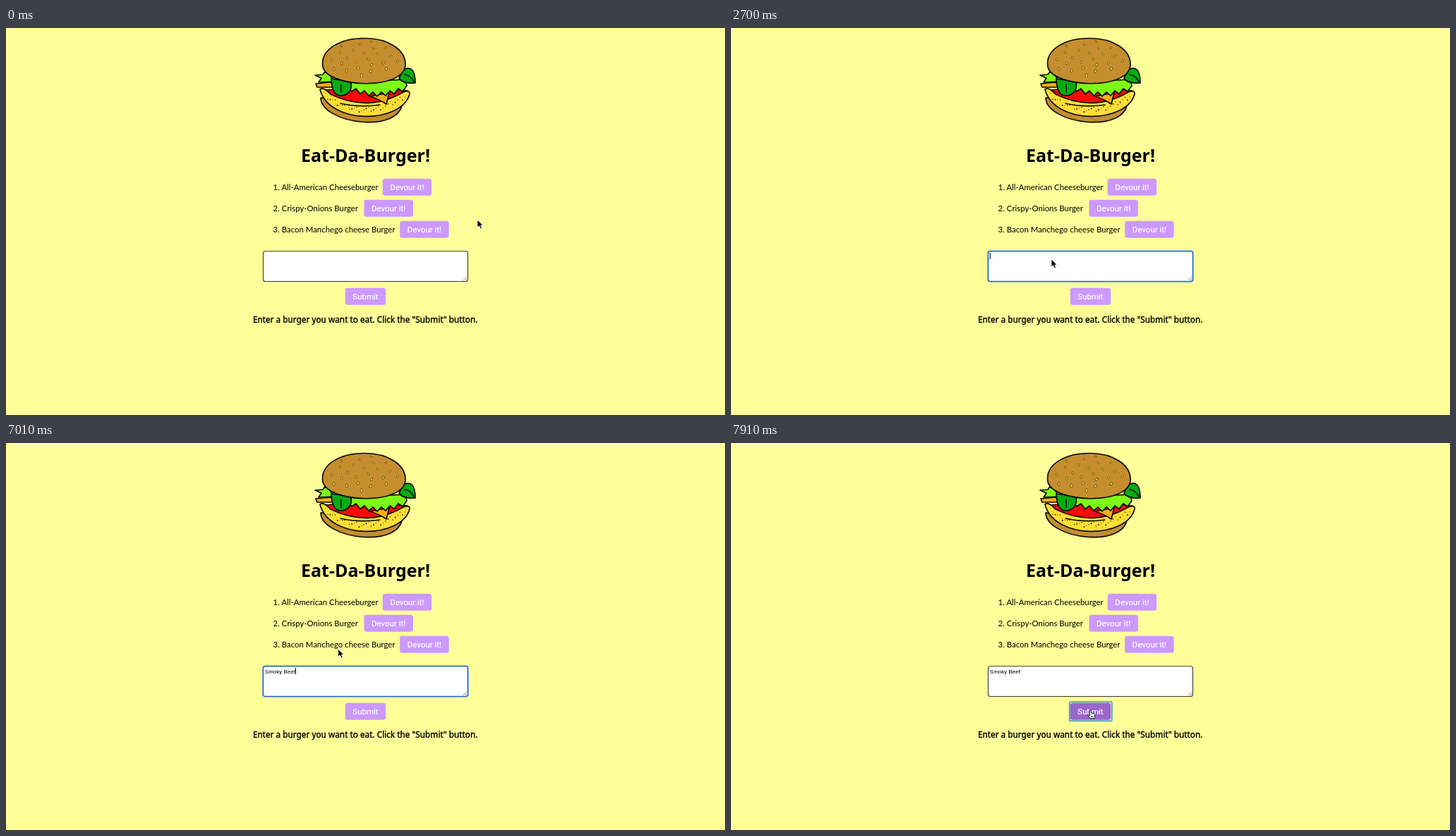
An HTML page that plays this animation: 1019 px wide and 549 px high, repeating every 8 s.

```html
<!DOCTYPE html>
<html lang="en">
<head>
<meta charset="utf-8">
<title>Eat-Da-Burger!</title>
<style>
  html, body { margin: 0; width: 100%; height: 100%; overflow: hidden; background: #fffe99; }
  svg { display: block; width: 100%; height: 100%; }
  text { white-space: pre; }
  .title { font: 700 25px "Noto Sans", "Open Sans", sans-serif; text-anchor: middle; }
  .hint { font: 11.8px "Noto Sans", "Open Sans", sans-serif; text-anchor: middle; stroke: #000; stroke-width: .35; }
  .item { font: 11.4px Lato, sans-serif; }
  .label { font: 11.5px Roboto, "Liberation Sans", sans-serif; fill: #fff; stroke: #fff; stroke-width: .2; text-anchor: middle; }
  .entry { font: 8px "Liberation Sans", Arial, sans-serif; }
  .burger path { stroke: #0b0b05; stroke-width: 1.7; stroke-linejoin: round; stroke-linecap: round; }
  .bun { fill: #c48e2e; }
  .cheese { fill: #ffad16; }
  .leaf { fill: #06ac10; }
  .lettuce { fill: #7dfa14; }
</style>
</head>
<body>
<svg viewBox="0 0 1019 549" preserveAspectRatio="none">
  <rect width="1019" height="549" fill="#fffe99"/>
  <g class="burger">
    <path class="bun" d="M446 99C447 136 562 152 562 103Z"/>
    <path fill="#f80a05" d="M452 88Q510 82 569 89C555 112 468 114 452 88Z"/>
    <path fill="#ffdf35" d="M445 87Q450 83 460 94Q514 120 563 91Q573 87 572 94C560 136 458 138 445 87Z"/>
    <path fill="none" d="M474 107Q500 113 530 109"/>
    <g id="specks" fill="#251b06"/>
    <path class="cheese" d="M439 79L460 77L466 84L441 84Z"/>
    <path class="cheese" d="M516 97L543 92L539 108Q529 101 516 97Z"/>
    <path class="lettuce" d="M438 67L449 66L452 62L458 65L465 76L443 77L447 71Z"/>
    <path class="lettuce" id="lettuce"/>
    <path class="leaf" d="M461 72Q462 96 474 96C487 96 492 84 488 76Z"/>
    <path class="leaf" d="M563 59Q580 51 580 78Q561 79 557 71Z"/>
    <path fill="none" stroke-width=".9" d="M475 80V91M565 66Q573 67 578 76"/>
    <path class="bun" d="M449 55C445 30 474 14.5 508 14.5S567 31 566 53C563 89 456 85 449 55Z"/>
    <g id="seeds" fill="#ffd947" stroke="#47320b" stroke-width=".7"/>
  </g>
  <text class="title" x="509.5" y="190">Eat-Da-Burger!</text>
  <g id="menu"></g>
  <rect id="glow" x="363.8" y="316" width="291.4" height="44" rx="3.5" fill="none" stroke="#a9cbdc" stroke-width="2"/>
  <rect id="box" x="364.5" y="316.7" width="290" height="42.8" rx="3" fill="#fff"/>
  <path d="M648 358L653 353M651 358L653 356" stroke="#777" stroke-width=".8"/>
  <text id="entry" class="entry" x="366.8" y="326.5"></text>
  <rect id="caret" y="319" width="1" height="9"/>
  <rect id="ring" x="479.8" y="367.2" width="60" height="27" rx="1" fill="#fff4bd" stroke="#5ca5c9" stroke-width="2"/>
  <g id="submit"></g>
  <text class="hint" x="509.2" y="417.7">Enter a burger you want to eat. Click the "Submit" button.</text>
  <path id="arrow" d="M0 0V11.2L2.6 8.8L4.6 13L6.6 12.1L4.7 8.1H8.2Z" stroke="#fff" stroke-width=".9"/>
  <path id="hand" d="M3 1Q5-.5 5.2 1.5L5.8 4.3Q11 4 10.9 7Q11 9.5 9.9 11.8H4.6Q3.4 9.7 1 7.6Q.6 6 3.8 7.7ZM6.2 8V10M8 8V10" fill="#fff" stroke="#000" stroke-width=".9" stroke-linejoin="round"/>
</svg>
<script>
const LOOP = 8000;
const FOCUS = 1650, HOVER = 7460, PRESS = 7910;
const BLINK = 455;
const ENTRY = "Smoky Beef";
const KEY_TIMES = [3440, 3890, 4180, 4330, 4770, 4920, 5510, 5960, 6260, 6560];

const $ = id => document.getElementById(id);
const clamp = v => Math.min(1, Math.max(0, v));
const show = (id, on) => $(id).setAttribute("visibility", on ? "visible" : "hidden");

function add(parent, tag, attrs, text = "") {
  const node = document.createElementNS("http://www.w3.org/2000/svg", tag);
  for (const key in attrs) node.setAttribute(key, attrs[key]);
  node.textContent = text;
  return parent.appendChild(node);
}

function addButton(parent, x, y, width, label) {
  const face = add(parent, "rect", { x, y, width, height: 24, rx: 3.5, fill: "#cc99ff" });
  add(parent, "text", { class: "label", x: x + width / 2, y: y + 16.3 }, label);
  return face;
}

function addMenuItem(number, name, buttonX) {
  const y = 183.7 + number * 30;
  add($("menu"), "text", { class: "item", x: 378.6, y: y + 16.5 }, `${number}. ${name}`);
  addButton($("menu"), buttonX, y, 69.5, "Devour it!");
}
addMenuItem(1, "All-American Cheeseburger", 533.7);
addMenuItem(2, "Crispy-Onions Burger", 507.4);
addMenuItem(3, "Bacon Manchego cheese Burger", 558.2);
const submitFace = addButton($("submit"), 480.8, 368.7, 57.4, "Submit");

// Sesame seeds on a golden-angle spiral, smaller towards the top
for (let i = 0; i < 24; i++) {
  const reach = Math.sqrt((i + 0.5) / 24), turn = i * 2.4;
  const cx = 506 + 52 * reach * Math.cos(turn);
  const cy = 44 + 26 * reach * Math.sin(turn);
  const size = 0.6 + cy / 70;
  add($("seeds"), "ellipse", {
    cx, cy, rx: size, ry: size * 1.6,
    transform: `rotate(${i * 67 % 110 - 55} ${cx} ${cy})`
  });
}

// Specks along the curved patty
for (let i = 0; i < 34; i++) {
  const u = (i + 0.5) / 17 - 1;
  add($("specks"), "circle", {
    cx: 509 + u * 58,
    cy: 116 - 21 * u * u + (i * 7 % 9 - 4) * 0.85,
    r: 0.55 + i % 3 * 0.2
  });
}

// Ragged lettuce edge
let edge = "M566 73L484 77";
for (let i = 0; i < 15; i++) {
  const u = i / 14;
  edge += `L${484 + 84 * u} ${82 + 9 * Math.sin(Math.PI * u) + (i % 2) * 6}`;
}
$("lettuce").setAttribute("d", edge + "Z");

// Pointer glides: curves that advance in visible steps
const glides = [
  { start: 470, step: 145, steps: 5, from: [668, 272], bend: [610, 240], to: [454, 328] },
  { start: 7010, step: 150, steps: 4, from: [454, 328], bend: [490, 224], to: [504.7, 379] }
];
function pointerAt(t) {
  const { start, step, steps, from, bend, to } = t < glides[1].start ? glides[0] : glides[1];
  const u = clamp((Math.floor((t - start) / step) + 1) / steps);
  return from.map((a, i) => (1 - u) ** 2 * a + 2 * u * (1 - u) * bend[i] + u * u * to[i]);
}

const faceColor = k => `rgb(${[204, 153, 255].map(c => Math.round(c - 51 * k))})`;

function draw(t) {
  const place = `translate(${pointerAt(t).join(" ")})`;
  const hovering = t >= HOVER, pressed = t >= PRESS;
  const focused = t >= FOCUS && !pressed;
  for (const id of ["arrow", "hand"]) $(id).setAttribute("transform", place);
  show("arrow", !hovering);
  show("hand", hovering);

  const count = KEY_TIMES.filter(time => time <= t).length;
  const blinkStart = count ? KEY_TIMES[count - 1] : FOCUS + 140;
  const phase = Math.floor(Math.max(0, t - blinkStart) / BLINK);
  $("entry").textContent = ENTRY.slice(0, count);
  $("caret").setAttribute("x", 366.8 + (count ? $("entry").getComputedTextLength() : 0));
  show("caret", focused && phase % 2 === 0);

  show("glow", focused);
  $("box").setAttribute("stroke", focused ? "#2f73bb" : "#38382f");
  $("box").setAttribute("stroke-width", focused ? 1.6 : 1.1);

  show("ring", pressed);
  const shade = pressed ? 1 : hovering ? 0.24 + 0.2 * clamp((t - HOVER) / 150) : 0;
  submitFace.setAttribute("fill", faceColor(shade));
}

const start = performance.now();
function tick() {
  draw((performance.now() - start) % LOOP);
  requestAnimationFrame(tick);
}
tick();
</script>
</body>
</html>
```
